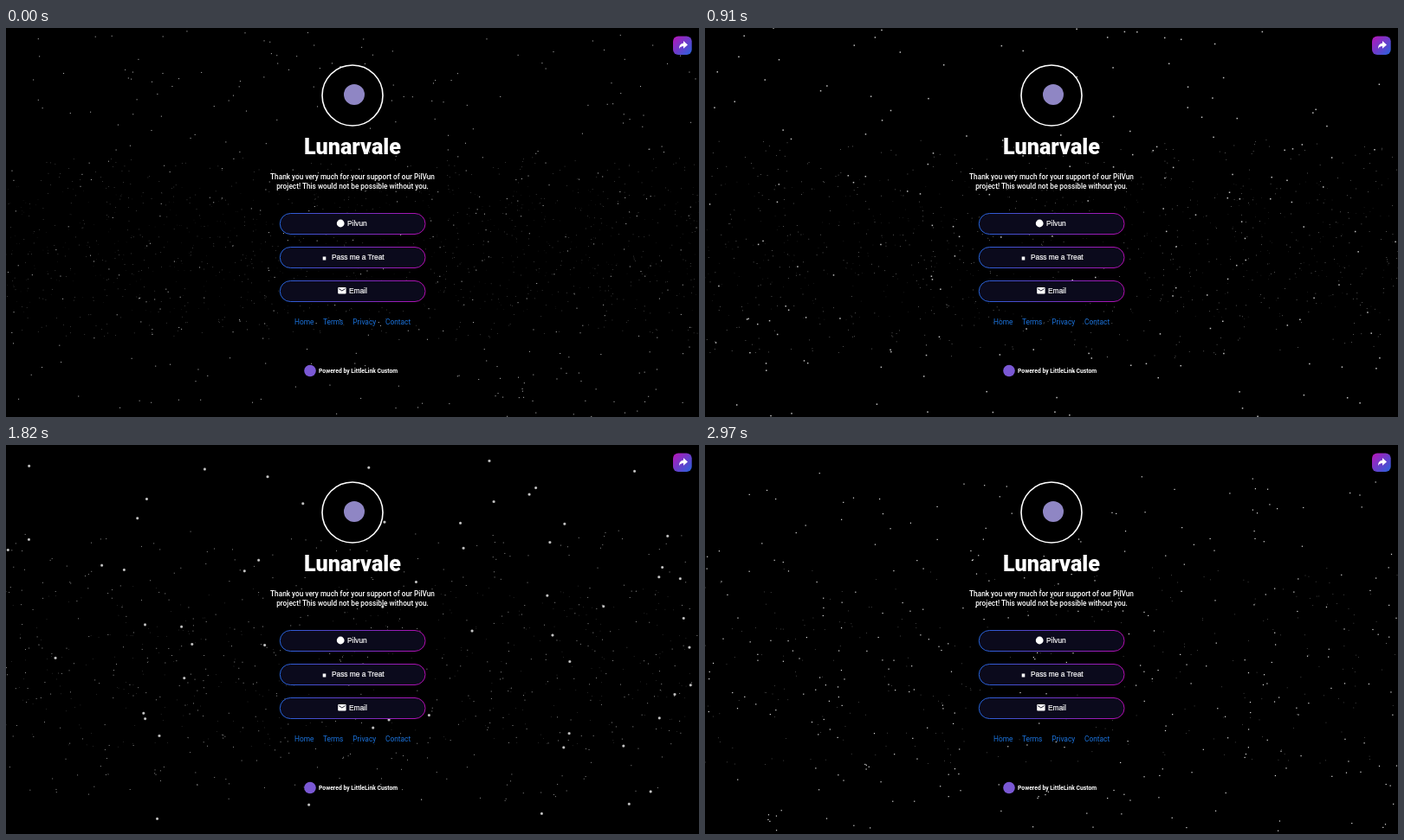
Write an HTML page with a canvas that moves like this. It is 800 px wide and 450 px high and loops after 3 s.

```html
<!DOCTYPE html>
<html lang="en">
<head>
<meta charset="utf-8">
<title>Lunarvale</title>
<style>
  html, body { margin: 0; width: 100%; height: 100%; overflow: hidden; background: #000; }
  canvas, svg { position: absolute; left: 0; top: 0; width: 800px; height: 450px; }
  text { fill: #fff; font: 8.33px Roboto, sans-serif; }
  .mid { text-anchor: middle; }
  .title { font-size: 25.2px; font-weight: 800; }
  .intro { font-size: 8.25px; font-weight: 500; }
  .label { font-family: "Liberation Sans", Arial, sans-serif; stroke: #fff; stroke-width: .2; }
  .link { fill: #1b73dd; }
  .credit { font-size: 6.8px; font-weight: 700; }
  .button { fill: #0b0a1c; stroke: url(#edge); stroke-width: 1; }
</style>
</head>
<body>
<canvas id="sky" width="800" height="450"></canvas>
<svg viewBox="0 0 800 450">
  <defs>
    <linearGradient id="edge">
      <stop stop-color="#2463d8"/><stop offset="1" stop-color="#b40cb0"/>
    </linearGradient>
    <linearGradient id="share" x2="1" y2="1">
      <stop stop-color="#b914b8"/><stop offset="1" stop-color="#2464dc"/>
    </linearGradient>
  </defs>

  <rect x="770" y="9.5" width="21.7" height="21.5" rx="6" fill="url(#share)"/>
  <path fill="#fff" d="M777 24c0-4 2-6.3 5-6.3v-2.7l5 4.4-5 4.4v-2.7c-2 0-3.8.8-5 2.9z"/>

  <circle cx="400" cy="78" r="35" stroke="#fff" stroke-width="1.6"/>
  <circle cx="402" cy="77" r="12" fill="#8f86c4"/>

  <text class="mid title" x="400" y="146">Lunarvale</text>
  <text class="mid intro" x="400" y="175">Thank you very much for your support of our PilVun</text>
  <text class="mid intro" x="400" y="186">project! This would not be possible without you.</text>

  <rect class="button" x="316.3" y="214.5" width="167.7" height="24" rx="12"/>
  <circle cx="386.2" cy="226" r="4.4" fill="#fff"/>
  <text class="label" x="394" y="229">Pilvun</text>

  <rect class="button" x="316.3" y="253.5" width="167.7" height="24" rx="12"/>
  <rect x="365.7" y="264.5" width="3.6" height="4" fill="#fff"/>
  <text class="label" x="376" y="268">Pass me a Treat</text>

  <rect class="button" x="316.3" y="292.5" width="167.7" height="24" rx="12"/>
  <rect x="383.2" y="300" width="9.4" height="7.4" rx="1" fill="#fff"/>
  <path d="M384.2 301.6l3.7 2.4 3.7-2.4" fill="none" stroke="#0b0a1c" stroke-width=".9"/>
  <text class="label" x="396" y="307">Email</text>

  <text class="link" x="333" y="343.3">Home</text>
  <text class="link" x="366" y="343.3">Terms</text>
  <text class="link" x="400.3" y="343.3">Privacy</text>
  <text class="link" x="438" y="343.3">Contact</text>

  <circle cx="351" cy="396.5" r="6.8" fill="#7a58d4"/>
  <text class="credit" x="361" y="399">Powered by LittleLink Custom</text>
</svg>
<script>
const LOOP = 3000, CX = 400, CY = 256;
const ctx = document.getElementById("sky").getContext("2d");

let seed = 870;
function random() {
  seed = (seed * 16807) % 2147483647;
  return seed / 2147483647;
}
const spread = half => (random() * 2 - 1) * half;

// "reach" is the second at which a layer passes the viewer.
function makeLayer(reach, halfW, halfH, count, alpha) {
  const stars = Array.from({ length: count }, () => [spread(halfW), spread(halfH)]);
  return { reach, alpha, stars };
}

const near = makeLayer(3.05, 1260, 775, 460, 0.68);
const layers = [
  makeLayer(8.2, 3280, 598, 480, 0.4),
  makeLayer(5.63, 2260, 598, 760, 0.62),
  near
];

// The last few stars to fly by replace any random ones near the axis.
const closeUp = 0.47;
const passing = [[91, -180], [192, -255], [361, -107], [-265, -64],
                 [4, -69], [231, 148], [110, 162], [62, 186]];
near.stars = near.stars
  .filter(([x, y]) => Math.abs(x) > 410 * closeUp || Math.abs(y) > 265 * closeUp)
  .concat(passing.map(([x, y]) => [x * closeUp, y * closeUp]));

function drawStar(x, y, size) {
  if (size < 2) {
    ctx.fillStyle = "#fff";
    ctx.fillRect(x - size / 2, y - size / 2, size, size);
    return;
  }
  const r = size * 0.8;
  const glow = ctx.createRadialGradient(x, y, 0, x, y, r);
  glow.addColorStop(0, "#fff");
  glow.addColorStop(0.45, "rgba(255,255,255,.9)");
  glow.addColorStop(1, "rgba(255,255,255,0)");
  ctx.fillStyle = glow;
  ctx.fillRect(x - r, y - r, r * 2, r * 2);
}

function draw(now) {
  const t = (now % LOOP) / 1000;
  ctx.globalAlpha = 1;
  ctx.fillStyle = "#000";
  ctx.fillRect(0, 0, 800, 450);
  for (const { reach, alpha, stars } of layers) {
    if (reach - t < 0.3) continue;
    const scale = 1 / (reach - t);
    ctx.globalAlpha = alpha + 0.08 * t;
    for (const [sx, sy] of stars) {
      const x = CX + sx * scale, y = CY + sy * scale;
      if (x > -12 && x < 812 && y > -12 && y < 462) drawStar(x, y, 3.2 * scale);
    }
  }
}

const start = performance.now();
function tick() {
  draw(performance.now() - start);
  requestAnimationFrame(tick);
}
tick();
</script>
</body>
</html>
```
